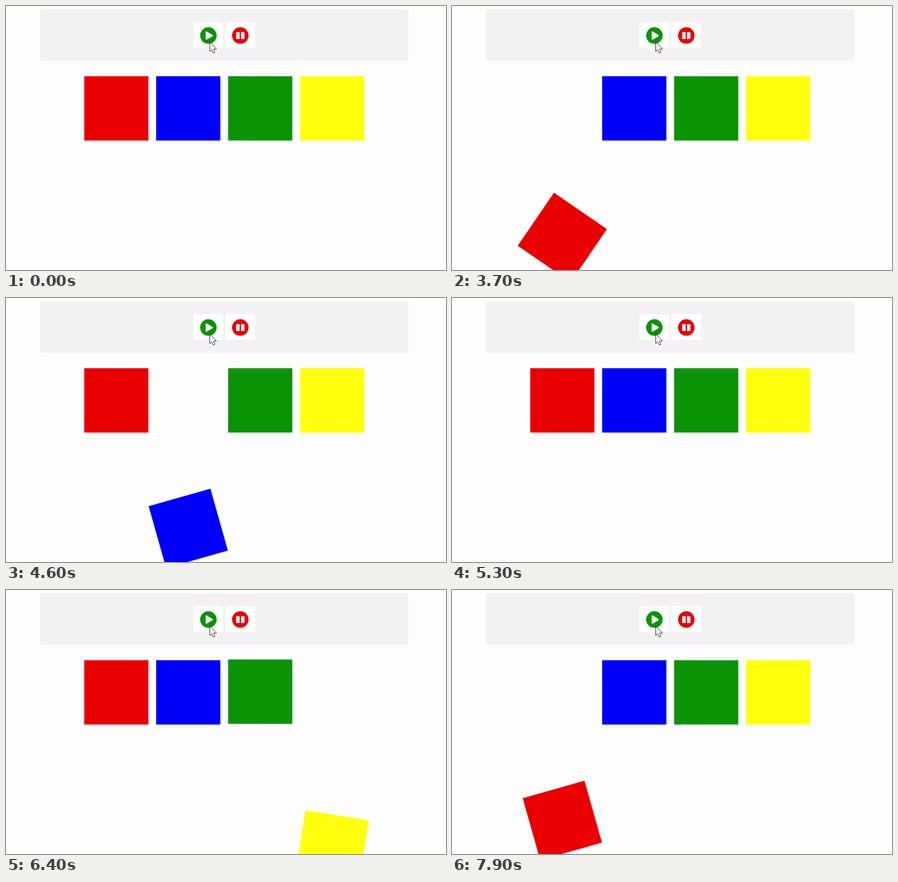
An HTML page with a canvas that plays this animation: 800 by 479 pixels, repeating every 8 s.

```html
<!DOCTYPE html>
<html lang="en">
<head>
<meta charset="utf-8">
<title>Staggered boxes</title>
<style>
  html, body { margin: 0; width: 100%; height: 100%; overflow: hidden; background: #fefdfe; }
  canvas { display: block; width: 800px; height: 479px; }
</style>
</head>
<body>
<canvas id="stage" width="800" height="479"></canvas>
<script>
const ctx = document.getElementById('stage').getContext('2d');

const LOOP = 8000, TICK = 100;
const FIRST_MOVE = 3700;   // everything rests before this time
const START = 3300, STAGGER = 1000, CYCLE = 4300;
const DROP_MS = 500, RISE_MS = 800, SPIN_MS = 1000;

const SIZE = 116.7, DROP = 2 * SIZE, REST_Y = 185.75;
const RED = '#ea0000', GREEN = '#0a9406';
const boxes = [RED, '#0000fa', GREEN, '#feff0c']
  .map((color, i) => ({ color, x: 200.6 + 130.8 * i, delay: STAGGER * i }));

const clamp01 = v => Math.min(1, Math.max(0, v));
const outElastic = t =>
  t <= 0 ? 0 : t >= 1 ? 1 : 1 - 2 ** (-10 * t) * Math.cos(4 * Math.PI * t);
const inOutSine = t => (1 - Math.cos(Math.PI * clamp01(t))) / 2;

function dropAt(phase) {
  return phase < DROP_MS
    ? DROP * outElastic(phase / DROP_MS)
    : DROP * (1 - outElastic((phase - DROP_MS) / RISE_MS));
}

function rect(x, y, w, h, color) {
  ctx.fillStyle = color;
  ctx.fillRect(x, y, w, h);
}

function disc(x, y, r, color) {
  ctx.fillStyle = color;
  ctx.beginPath();
  ctx.arc(x, y, r, 0, 2 * Math.PI);
  ctx.fill();
}

function polygon(points) {
  ctx.beginPath();
  points.forEach(([x, y]) => ctx.lineTo(x, y));
  ctx.closePath();
}

function drawControls() {
  rect(62, 6.5, 669.5, 93, '#f3f1f4');
  rect(341, 29.3, 53.5, 46.7, '#ffffff');
  rect(399, 29.3, 54, 46.7, '#ffffff');

  disc(368, 53.6, 15, GREEN);
  ctx.fillStyle = ctx.strokeStyle = '#ffffff';
  ctx.lineWidth = 2.5;
  ctx.lineJoin = 'round';
  polygon([[364.25, 47.35], [364.25, 59.85], [374.9, 53.6]]);
  ctx.fill();
  ctx.stroke();

  disc(426, 53.6, 15, RED);
  rect(418.5, 47.35, 6.25, 12.5, '#ffffff');
  rect(427.25, 47.35, 6.25, 12.5, '#ffffff');
}

function drawBox(box, time) {
  const clock = time < FIRST_MOVE ? 0 : (time - START) % CYCLE;
  const phase = Math.max(0, clock - box.delay);
  ctx.save();
  ctx.translate(box.x, REST_Y + dropAt(phase));
  ctx.rotate(2 * Math.PI * inOutSine(phase / SPIN_MS));
  rect(-SIZE / 2, -SIZE / 2, SIZE, SIZE, box.color);
  ctx.restore();
}

function drawPointer() {
  polygon([[370.5, 65.5], [370.5, 82.5], [374, 79.5], [376.8, 85.3],
           [379.8, 84], [377.3, 78.3], [382.6, 78]]);
  ctx.fillStyle = '#ffffff';
  ctx.strokeStyle = '#222222';
  ctx.lineWidth = 1;
  ctx.lineJoin = 'miter';
  ctx.fill();
  ctx.stroke();
}

function draw(time) {
  rect(0, 0, 800, 479, '#fefdfe');
  drawControls();
  boxes.forEach(box => drawBox(box, time));
  drawPointer();
}

const origin = performance.now();
function frame() {
  const elapsed = (performance.now() - origin) % LOOP;
  draw(Math.floor(elapsed / TICK) * TICK);
  requestAnimationFrame(frame);
}
frame();
</script>
</body>
</html>
```
